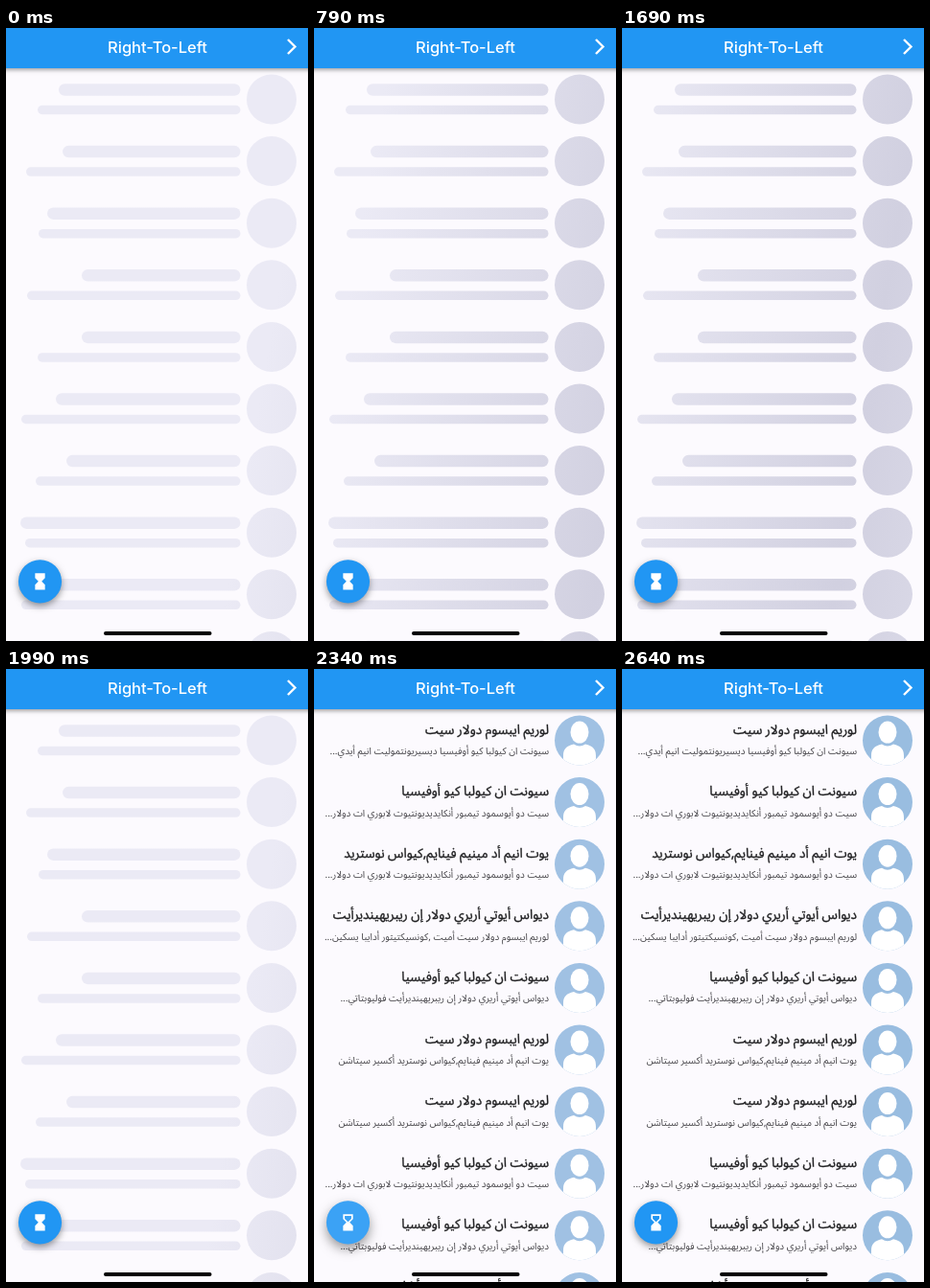
Write an HTML page with a canvas that moves like this. It is 315 px wide and 640 px high and loops after 3340 ms.

```html
<!DOCTYPE html>
<html lang="ar">
<head>
<meta charset="utf-8">
<title>Right-To-Left</title>
<style>
  html, body { margin: 0; width: 100%; height: 100%; overflow: hidden; background: #fcfafe; }
  canvas { display: block; width: 315px; height: 640px; }
</style>
</head>
<body>
<canvas id="stage"></canvas>
<script>
const W = 315, H = 640, LOOP = 3340, LOADED = 2340;
const BLUE = '#2196f3', RIGHT = 244.5;
const ARABIC = '"Noto Sans Arabic", "DejaVu Sans", sans-serif';
const canvas = document.getElementById('stage');
const ctx = canvas.getContext('2d');
const dpr = window.devicePixelRatio || 1;
canvas.width = W * dpr;
canvas.height = H * dpr;
ctx.scale(dpr, dpr);

const titles = [
  'لوريم ايبسوم دولار سيت',
  'سيونت ان كيولبا كيو أوفيسيا',
  'يوت انيم أد مينيم فينايم,كيواس نوستريد',
  'ديواس أيوتي أريري دولار إن ريبريهينديرأيت',
  'سيت دو أيوسمود تيمبور أنكايديد'
];
const details = [
  'سيونت ان كيولبا كيو أوفيسيا ديسيريونتموليت انيم أيدي...',
  'سيت دو أيوسمود تيمبور أنكايديديونتيوت لابوري ات دولار...',
  'لوريم ايبسوم دولار سيت أميت ,كونسيكتيتور أدايبا يسكين...',
  'ديواس أيوتي أريري دولار إن ريبريهينديرأيت فوليوبتاتي...',
  'يوت انيم أد مينيم فينايم,كيواس نوستريد أكسير سيتاشن'
];

// title index, detail index, left end of title bone, left end of detail bone
const rows = [
  [0, 0, 55, 33], [1, 1, 59, 21], [2, 1, 43, 34], [3, 2, 79, 22], [1, 3, 79, 33],
  [0, 4, 52, 16], [0, 4, 63, 31], [1, 1, 15, 20], [1, 3, 40, 16], [4, 0, 50, 30]
].map(([title, detail, x1, x2], i) => ({
  title: titles[title], detail: details[detail], x1, x2, y: 74.5 + i * 64.6
}));

// Shimmer passes: start, end, centre at start; it advances 1 px per ms, then holds
const passes = [
  [0, 0, 587], [290, 540, -190], [690, 990, 240], [1240, 2010, -182], [2260, LOADED, -205]
];

const hourglassFull = new Path2D('M6 2v6l4 4-4 4v6h12v-6l-4-4 4-4V2z');
const hourglassBottom = new Path2D('M18 22v-6l-4-4 4-4V2H6v6l4 4-4 4v6zM8 7.5V4h8v3.5l-4 4z');

const clamp = v => Math.max(0, Math.min(1, v));

// One font whose size makes a sample line the given length
function fitFont(weight, family, sample, width) {
  ctx.font = `${weight} 100px ${family}`;
  return `${weight} ${100 * width / ctx.measureText(sample).width}px ${family}`;
}
const headFont = fitFont(500, 'Inter, Roboto, sans-serif', 'Right-To-Left', 104);
const titleFont = fitFont(500, ARABIC, titles[1], 154);
const detailFont = fitFont(400, ARABIC, details[4], 220);

function circle(x, y, r) {
  ctx.beginPath();
  ctx.arc(x, y, r, 0, 7);
  ctx.fill();
}

function pill(x1, x2, y, h) {
  ctx.beginPath();
  ctx.roundRect(x1, y - h / 2, x2 - x1, h, h / 2);
  ctx.fill();
}

function shadow(color, blur, dy) {
  ctx.shadowColor = color;
  ctx.shadowBlur = blur * dpr;
  ctx.shadowOffsetY = dy * dpr;
}

function shimmerFill(t) {
  const [start, end, from] = passes.findLast(p => p[0] <= t);
  const stepped = Math.max(start, Math.floor((t - 40) / 50) * 50 + 40);
  const x = from + Math.min(stepped, end) - start;
  const g = ctx.createLinearGradient(x - 378, 256, x + 378, 384);
  g.addColorStop(0.1, '#ebeaf5');
  g.addColorStop(0.5, '#d1d0e0');
  g.addColorStop(0.9, '#ebeaf5');
  return g;
}

function drawBones(t) {
  ctx.fillStyle = shimmerFill(t);
  for (const { x1, x2, y } of rows) {
    circle(277, y, 26);
    pill(x1, RIGHT, y - 10, 12.5);
    pill(x2, RIGHT, y + 11, 9.5);
  }
}

function drawAvatar(y, color) {
  ctx.save();
  ctx.translate(277, y);
  ctx.fillStyle = color;
  circle(0, 0, 26);
  ctx.clip();
  ctx.fillStyle = '#fff';
  ctx.beginPath();
  ctx.ellipse(0, -8.5, 9.5, 11.5, 0, 0, 7);
  ctx.fill();
  ctx.fill(new Path2D('M-17 27V16C-17 9-14 6-6 4Q0 8 6 4C14 6 17 9 17 16V27z'));
  ctx.restore();
}

function drawList(t) {
  ctx.direction = 'rtl';
  ctx.textAlign = 'right';
  ctx.lineWidth = 0.35;
  for (const { title, detail, y } of rows) {
    drawAvatar(y, t < 2390 ? '#a0c1e3' : '#99bde0');
    ctx.fillStyle = ctx.strokeStyle = '#202022';
    ctx.font = titleFont;
    ctx.fillText(title, 245, y - 7);
    ctx.strokeText(title, 245, y - 7);
    ctx.fillStyle = '#444347';
    ctx.font = detailFont;
    ctx.fillText(detail, 245, y + 14.5);
  }
}

function drawHeader() {
  ctx.save();
  shadow('rgba(0,0,0,.35)', 4, 1.5);
  ctx.fillStyle = BLUE;
  ctx.fillRect(-10, -10, W + 20, 52);
  ctx.restore();
  ctx.fillStyle = ctx.strokeStyle = '#fff';
  ctx.direction = 'ltr';
  ctx.textAlign = 'center';
  ctx.font = headFont;
  ctx.fillText('Right-To-Left', 158, 25.5);
  ctx.lineWidth = 2.4;
  ctx.stroke(new Path2D('M294 12L301.5 19.5L294 27'));
}

function drawButton(t) {
  const press = clamp((t - 2100) / 160) * clamp((2410 - t) / 70);
  ctx.save();
  shadow('rgba(0,0,0,.4)', 7 + 5 * press, 3 + 2 * press);
  ctx.fillStyle = BLUE;
  circle(35.5, 577.8, 22.6);
  ctx.restore();
  ctx.fillStyle = `rgba(255,255,255,${0.12 * press})`;
  circle(35.5, 577.8, 22.6);
  ctx.save();
  ctx.translate(35.5, 577.8);
  ctx.scale(0.86, 0.86);
  ctx.translate(-12, -12);
  ctx.fillStyle = '#fff';
  ctx.fill(t < 2210 ? hourglassFull : hourglassBottom, 'evenodd');
  ctx.restore();
}

function draw(now) {
  const t = now % LOOP;
  ctx.fillStyle = '#fcfafe';
  ctx.fillRect(0, 0, W, H);
  if (t < LOADED) drawBones(t);
  else drawList(t);
  drawHeader();
  drawButton(t);
  ctx.fillStyle = '#000';
  pill(102, 214.5, 632, 4);
}

const begin = performance.now();
function tick() {
  draw(performance.now() - begin);
  requestAnimationFrame(tick);
}
tick();
</script>
</body>
</html>
```
